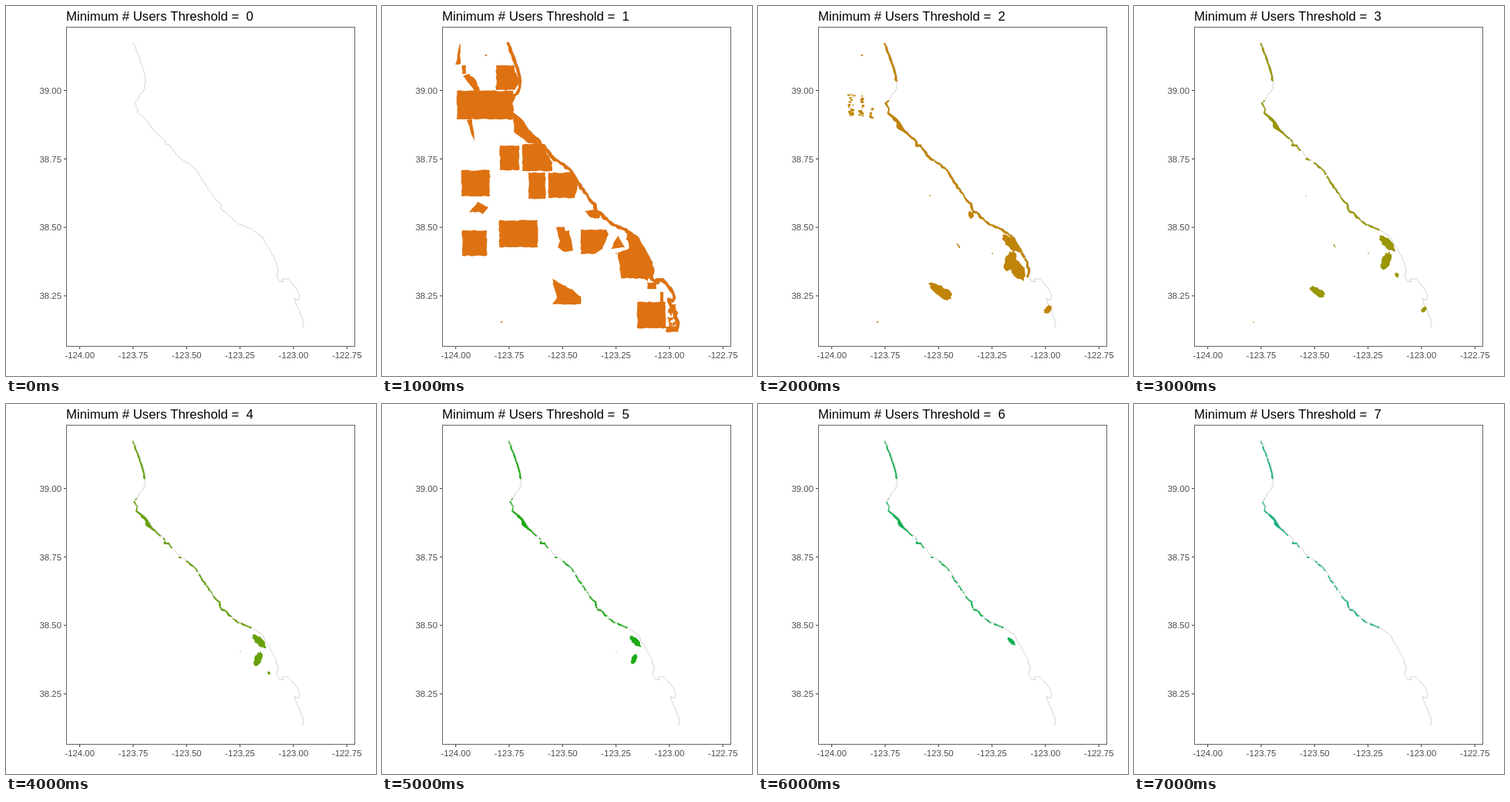
Write an HTML page with a canvas that moves like this. It is 480 px wide and 480 px high and loops after 8 s.

```html
<!DOCTYPE html>
<html>
<head>
<meta charset="utf-8">
<style>
html, body { margin: 0; width: 100%; height: 100%; overflow: hidden; background: #fff }
canvas { display: block }
</style>
</head>
<body>
<canvas width="480" height="480"></canvas>
<script>
const ctx = document.querySelector('canvas').getContext('2d');
const colors = ['#fff', '#de7212', '#c08408', '#999607', '#67a10a', '#1cab14', '#14b052', '#1cb185'];

const points = string => string.split(/\s+/).map(p => p.split(',').map(Number));
const random = seed => {
  const v = Math.sin(seed * 12.9898) * 43758.5453;
  return v - Math.floor(v);
};
const noise = x => {
  const i = Math.floor(x);
  return random(i) + (random(i + 1) - random(i)) * (x - i);
};
const bump = (y, center, spread) => Math.exp(-(((y - center) / spread) ** 2));

// Subdivides a line and shakes the points between its corners.
function roughen(corners, step, amount) {
  const out = [];
  for (let i = 0; i < corners.length - 1; i++) {
    const [x0, y0] = corners[i], [x1, y1] = corners[i + 1];
    const n = Math.max(1, Math.round(Math.hypot(x1 - x0, y1 - y0) / step));
    for (let k = 0; k < n; k++) {
      const shake = k ? amount : 0, seed = x0 + y0 * 3 + k * 7;
      out.push([
        x0 + (x1 - x0) * k / n + (random(seed) - 0.5) * shake,
        y0 + (y1 - y0) * k / n + (random(seed + 0.5) - 0.5) * shake
      ]);
    }
  }
  return [...out, corners.at(-1)];
}

const shore = points(`165,47 169,58 174,70 179,86 181,97 179,108 167,125 171,133 170,138
184,150 191,161 207,176 207,180 212,180 226,198 237,204 247,213 259,231 271,250 278,256
279,263 290,273 302,283 318,289 333,300 339,311 347,325 353,340 351,350 355,357 360,358
358,354 366,354 376,365 381,377 379,382 374,379 382,399 386,410 385,417`);
const coast = roughen(shore, 4, 1.8);
const coastSteps = roughen(coast, 1, 0);

// Boxes surveyed by a single user: x, y, width, height.
const blocks = points(`97,110,73,37 148,77,24,32 153,181,25,32 103,213,37,34 104,291,32,33
152,278,50,35 190,216,22,34 216,216,32,33 331,384,37,34 368,416,16,7 104,77,5,11`);

const patches = [
  '101.5,48 102,75 95,76', '105,91 113,88 121,95 127,110 120,110', '110,148 117,147 120,176',
  '165,77 175,89 179,98 172,109 165,109', '246,216 255,228 250,249 240,249',
  '113,268 124,254 138,261 131,270 125,267', '263,266 275,264 284,270 281,276 270,274',
  '226,287 236,286 238,292 243,291 248,317 237,319 228,313 231,305',
  '258,290 291,290 294,296 286,315 277,321 258,322', '297,315 306,298 315,313',
  '221,354 240,365 258,377 258,387 221,387 227,378', '344,358 356,360 356,367 344,367'
].map(points).concat([
  [...shore.slice(8, 11), [204, 179], [190, 178], [171, 163]],
  [[182, 180], ...shore.slice(11, 13), [221, 203], [221, 214], [182, 214]],
  [...shore.slice(23, 28), [346, 354], [310, 353], [306, 320], [320, 315]]
]);

// Places shared by several users, shrinking up to the last threshold that shows them.
const hotspots = [
  { x: 329, y: 308, rx: 14, ry: 6, turn: 0.75, last: 6 },
  { x: 327, y: 331, rx: 13, ry: 6.5, turn: 1.9, last: 5 },
  { x: 336, y: 341, rx: 16, ry: 8, turn: 0.9, last: 2 },
  { x: 341, y: 349, rx: 4, ry: 3, turn: 1, last: 4 },
  { x: 238, y: 371, rx: 15, ry: 7, turn: 0.6, last: 3 },
  { x: 376, y: 394, rx: 6, ry: 4.5, turn: 2, last: 3 },
  { x: 276, y: 271, rx: 5, ry: 3.5, turn: 1.3, last: 2 },
  { x: 226, y: 361, rx: 5, ry: 2, turn: 0.2, last: 2 },
  { x: 155, y: 410, rx: 1.2, ry: 1, turn: 0, last: 3 },
  { x: 260, y: 311, rx: 4, ry: 1, turn: 1, last: 3 },
  { x: 304, y: 321, rx: 1, ry: 0.8, turn: 0, last: 5 },
  { x: 223, y: 246, rx: 1.2, ry: 0.8, turn: 0, last: 3 },
  { x: 135, y: 64, rx: 1.2, ry: 1.2, turn: 0, last: 2 }
];

function trace(path) {
  ctx.beginPath();
  for (const [x, y] of path) ctx.lineTo(x, y);
}

function fillRough(corners, amount = 1.5) {
  trace(roughen([...corners, corners[0]], 4, amount));
  ctx.fill();
}

function line(path, color) {
  ctx.strokeStyle = color;
  trace(path);
  ctx.stroke();
}

function text(string, x, y, size, color, align) {
  ctx.font = size + 'px "Liberation Sans", Arial, sans-serif';
  ctx.fillStyle = color;
  ctx.textAlign = align;
  ctx.fillText(string, x, y);
}

// A broken band just offshore; it thins out as the threshold rises.
function drawBand(threshold) {
  const end = [0, 424, 350][threshold] || 290;
  coastSteps.forEach(([x, y], i) => {
    if (y > end || (threshold > 1 && y > 96 && y < 122)) return;
    const sparse = threshold > 2 ? 0.3 * bump(y, 190, 14) : 0;
    if (noise(i / 3) < 0.04 * (threshold - 1) + sparse) return;
    const bulge = (4 - threshold * 0.25) * bump(y, 153, 9) + 0.8 * bump(y, 84, 9);
    const width = (1.3 + 2.6 / threshold + bulge) * (0.7 + 0.6 * noise(i / 4 + 50));
    const shift = width / 2 + 0.4;
    ctx.beginPath();
    ctx.arc(x - shift * 0.8, y + shift * 0.55, width / 2, 0, 7);
    ctx.fill();
  });
}

function drawHotspot({ x, y, rx, ry, turn, last }, threshold) {
  if (threshold > last) return;
  const scale = Math.min(1, Math.sqrt((last + 1 - threshold) / (last - 1)));
  ctx.beginPath();
  for (let k = 0; k < 20; k++) {
    const angle = k * Math.PI / 10;
    const r = scale * (0.75 + 0.45 * random(x + k));
    const u = rx * r * Math.cos(angle), v = ry * r * Math.sin(angle);
    ctx.lineTo(x + u * Math.cos(turn) - v * Math.sin(turn), y + u * Math.sin(turn) + v * Math.cos(turn));
  }
  ctx.fill();
}

function drawSpeckles(x, y, w, h) {
  for (let k = 0; k < w * h / 9; k++) {
    const seed = x + k * 5;
    ctx.fillRect(x + random(seed) * w, y + random(seed + 1) * h, 1 + random(seed + 2) * 3, 1 + random(seed + 3) * 2.5);
  }
}

function drawData(threshold) {
  ctx.fillStyle = colors[threshold];
  drawBand(threshold);
  for (const spot of hotspots) drawHotspot(spot, threshold);
  if (threshold === 1) {
    for (const [x, y, w, h] of blocks) fillRough([[x, y], [x + w, y], [x + w, y + h], [x, y + h]]);
    for (const patch of patches) fillRough(patch);
    drawSpeckles(370, 386, 11, 30);
    ctx.fillRect(361, 371, 4, 14);
  }
  if (threshold === 2) {
    drawSpeckles(116, 112, 7, 30);
    drawSpeckles(130, 115, 5, 28);
    drawSpeckles(144, 132, 4, 13);
  }
}

function drawAxes() {
  ctx.strokeStyle = '#666';
  ctx.strokeRect(78.5, 27.5, 374, 414);
  for (let i = 0; i < 6; i++) {
    const x = 95.7 + i * 69.3;
    line([[x, 442], [x, 445]], '#333');
    text((-124 + i * 0.25).toFixed(2), x, 457, 11.4, '#4d4d4d', 'center');
  }
  for (let i = 0; i < 4; i++) {
    const y = 109.6 + i * 88.8;
    line([[75, y], [78, y]], '#333');
    text((39 - i * 0.25).toFixed(2), 72, y + 4.2, 11.4, '#4d4d4d', 'right');
  }
}

function draw(now) {
  const threshold = Math.floor(now / 1000) % colors.length;
  ctx.fillStyle = '#fff';
  ctx.fillRect(0, 0, 480, 480);
  line(coast, '#d3d3d3');
  if (threshold) drawData(threshold);
  drawAxes();
  text('Minimum # Users Threshold =  ' + threshold, 78, 19, 16.8, '#000', 'left');
  requestAnimationFrame(draw);
}
requestAnimationFrame(draw);
</script>
</body>
</html>
```
